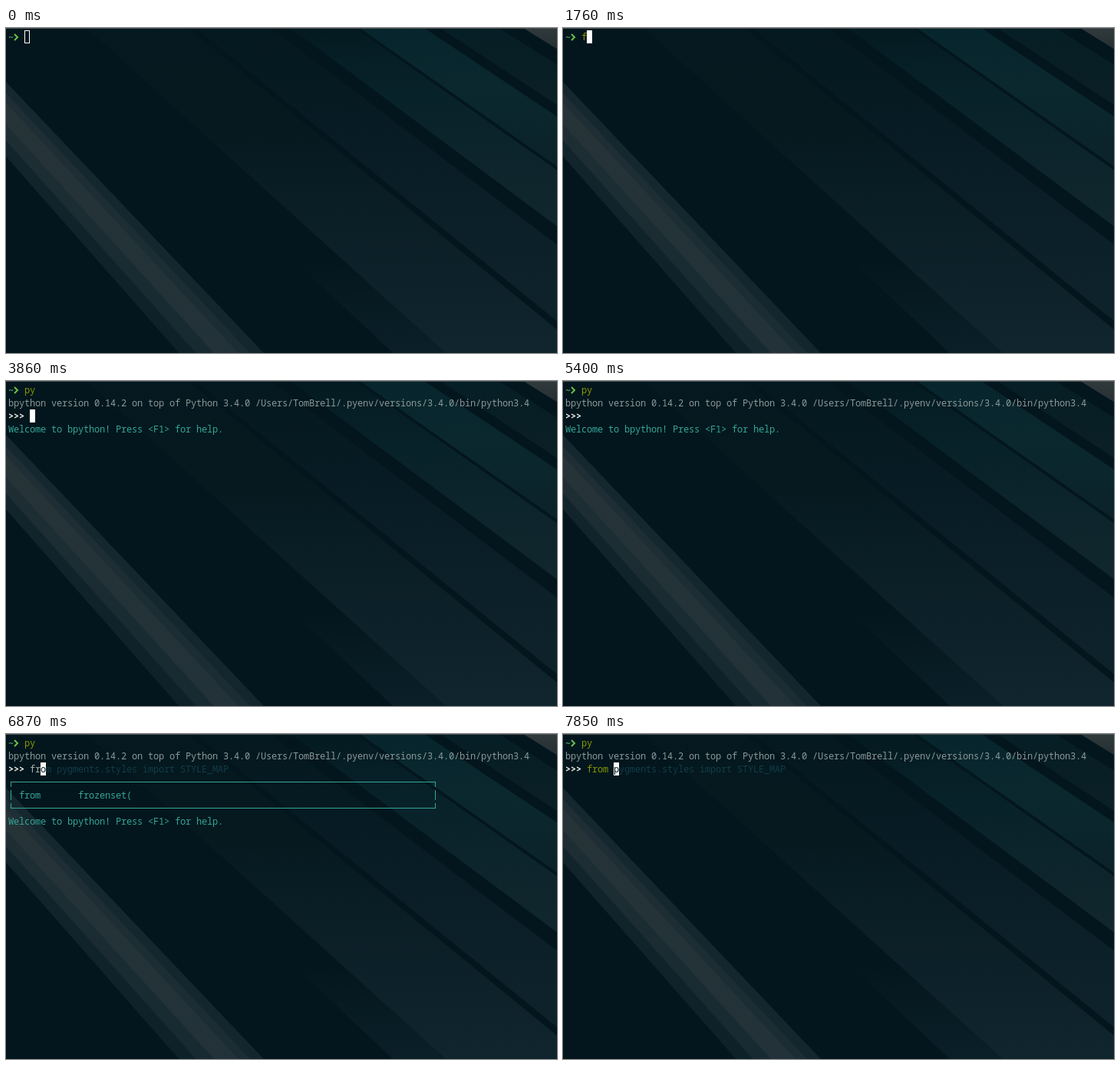
Write an HTML page with a canvas that moves like this. It is 718x423 px and loops after 8000 ms.

```html
<!DOCTYPE html>
<html lang="en">
<head>
<meta charset="utf-8">
<title>Terminal session</title>
<style>
  html, body { margin: 0; width: 100%; height: 100%; overflow: hidden; background: #03161d; }
  canvas { display: block; width: 100vw; height: 100vh; }
</style>
</head>
<body>
<canvas id="stage" width="718" height="423"></canvas>
<script>
const W = 718, H = 423, LOOP = 8000;
const CELL_W = 7, CELL_H = 17, PAD = 3;
const FONT = '12px "Noto Sans Mono", "DejaVu Sans Mono", monospace';
const C = {
  base: '#03161d', white: '#ffffff', prompt: '#eef0ea', grey: '#8a9999', input: '#a9b5b2',
  olive: '#859900', cyan: '#35a698', dim: '#123c49', tilde: '#4fa873', arrow: '#6cc04a'
};
const VERSION = 'bpython version 0.14.2 on top of Python 3.4.0 /Users/TomBrell/.pyenv/versions/3.4.0/bin/python3.4';
const WELCOME = 'Welcome to bpython! Press <F1> for help.';
const SUGGESTION = 'from pygments.styles import STYLE_MAP';
const MENU_F = [['filter(', 'finally', 'float(', 'for', 'format(', 'from'], ['frozenset(']];
const MENU_FR = [['from', 'frozenset(']];

// Each step changes only the fields it names; the others carry over.
const steps = [
  { at: 0, cmd: '', cmdColor: C.olive, cursor: [3, 0], shape: 'hollow', version: false, repl: false, input: '', menu: null, welcome: false },
  { at: 500, shape: 'block' },
  { at: 640, shape: 'none' },
  { at: 1200, shape: 'block' },
  { at: 1690, cmd: 'f', cmdColor: C.grey, cursor: [4, 0] },
  { at: 1760, cmdColor: C.olive },
  { at: 2320, cmd: '', cursor: [3, 0] },
  { at: 2600, cmd: 'p', cursor: [4, 0] },
  { at: 2740, cmd: 'py', cursor: [5, 0] },
  { at: 3160, cursor: [0, 1] },
  { at: 3790, version: true, cursor: [0, 2] },
  { at: 3860, repl: true, welcome: true, cursor: [4, 2] },
  { at: 5400, shape: 'none' },
  { at: 5890, shape: 'block' },
  { at: 6240, input: 'f', menu: MENU_F, cursor: [5, 2] },
  { at: 6870, input: 'fr', menu: MENU_FR, cursor: [6, 2] },
  { at: 6940, input: 'fro', cursor: [7, 2] },
  { at: 7010, input: 'from', menu: null, welcome: false, cursor: [8, 2] },
  { at: 7850, input: 'from ', cursor: [9, 2] }
];

const ctx = document.getElementById('stage').getContext('2d');
const backdrop = makeBackdrop();

const cellX = col => PAD + col * CELL_W;
const cellY = row => PAD + row * CELL_H;

// Soft planks that share one vanishing point; u is where an edge meets the top.
function makeBackdrop() {
  const canvas = document.createElement('canvas');
  canvas.width = W;
  canvas.height = H;
  const g = canvas.getContext('2d');
  const edge = (u, y) => (u + 1128) * (y + 1114) / 1114 - 1128;

  function plank(u1, u2, ...stops) {
    const fill = g.createLinearGradient(0, 0, 0, H);
    for (const [y, color] of stops) fill.addColorStop(y / H, color);
    g.fillStyle = fill;
    g.beginPath();
    g.moveTo(edge(u1, 0), 0);
    g.lineTo(edge(u2, 0), 0);
    g.lineTo(edge(u2, H), H);
    g.lineTo(edge(u1, H), H);
    g.fill();
  }

  g.fillStyle = C.base;
  g.fillRect(0, 0, W, H);

  plank(-147, -130, [0, '#15272d'], [H, '#0d2129']);
  plank(-131, -113, [0, '#213035'], [H, '#172a31']);
  plank(-114, -90, [0, '#273438'], [H, '#223238']);
  plank(-91, -79, [0, '#202f35'], [H, '#1b2c33']);
  plank(-80, -67, [0, '#16282f'], [H, '#13262e']);

  plank(55, 105, [300, C.base], [360, '#071b23'], [H, '#0a1f27']);
  plank(105, 237, [0, '#04181f'], [130, '#05191f'], [210, '#091d25'], [H, '#10252d']);
  plank(247, 345, [0, '#04181f'], [150, '#071c24'], [330, '#0d222a']);
  plank(371, 455, [0, '#041a21'], [85, '#08222a'], [265, '#12272e']);
  plank(461, 545, [0, '#07252c'], [80, '#0b282f'], [180, '#0b2229']);
  plank(566, 642, [0, '#061e25'], [85, '#0a1f26']);
  plank(674, 760, [0, '#30393b'], [30, '#252f33']);

  g.fillStyle = '#4b5456';
  g.fillRect(0, 0, W, 1);
  return canvas;
}

function text(str, col, row, color, bold) {
  ctx.font = (bold ? 'bold ' : '') + FONT;
  ctx.fillStyle = color;
  [...str].forEach((ch, i) => ctx.fillText(ch, cellX(col + i), cellY(row) + 13));
}

function shellPrompt() {
  text('~', 0, 0, C.tilde, true);
  ctx.strokeStyle = C.arrow;
  ctx.lineWidth = 2;
  ctx.beginPath();
  ctx.moveTo(11, 8);
  ctx.lineTo(15, 12);
  ctx.lineTo(11, 16);
  ctx.stroke();
}

function menuBox(rows) {
  const left = 6, right = 559, top = cellY(3) + 8, bottom = cellY(4 + rows.length) + 8;
  ctx.fillStyle = C.cyan;
  for (const y of [top, bottom]) ctx.fillRect(left, y, right - left + 1, 1);
  for (const x of [left, right]) {
    ctx.fillRect(x, top, 1, 7);
    ctx.fillRect(x, bottom - 6, 1, 7);
    rows.forEach((_, i) => ctx.fillRect(x, cellY(4 + i) + 2, 1, 13));
  }
  rows.forEach((words, i) =>
    words.forEach((word, j) => text(word, 2 + j * 11, 4 + i, C.cyan)));
}

function drawCursor([col, row], shape, under) {
  const x = cellX(col), y = cellY(row);
  if (shape === 'hollow') {
    ctx.strokeStyle = C.white;
    ctx.lineWidth = 1;
    ctx.strokeRect(x + 0.5, y + 0.5, CELL_W - 1, CELL_H - 1);
  } else if (shape === 'block') {
    ctx.fillStyle = C.white;
    ctx.fillRect(x, y, CELL_W, CELL_H);
    text(under, col, row, C.base);
  }
}

function stateAt(t) {
  return Object.assign({}, ...steps.filter(step => step.at <= t));
}

function draw(t) {
  const s = stateAt(t);
  const typed = s.input.length;
  ctx.drawImage(backdrop, 0, 0);
  shellPrompt();
  text(s.cmd, 3, 0, s.cmdColor);
  if (s.version) text(VERSION, 0, 1, C.grey);
  if (s.repl) text('>>>', 0, 2, C.prompt, true);
  if (typed) {
    text(s.input, 4, 2, s.input.startsWith('from') ? C.olive : C.input);
    text(SUGGESTION.slice(typed), 4 + typed, 2, C.dim);
  }
  if (s.menu) menuBox(s.menu);
  if (s.welcome) text(WELCOME, 0, s.menu ? 5 + s.menu.length : 3, C.cyan);
  drawCursor(s.cursor, s.shape, typed ? SUGGESTION[typed] : '');
}

const start = performance.now();
function tick() {
  draw((performance.now() - start) % LOOP);
  requestAnimationFrame(tick);
}
tick();
</script>
</body>
</html>
```
